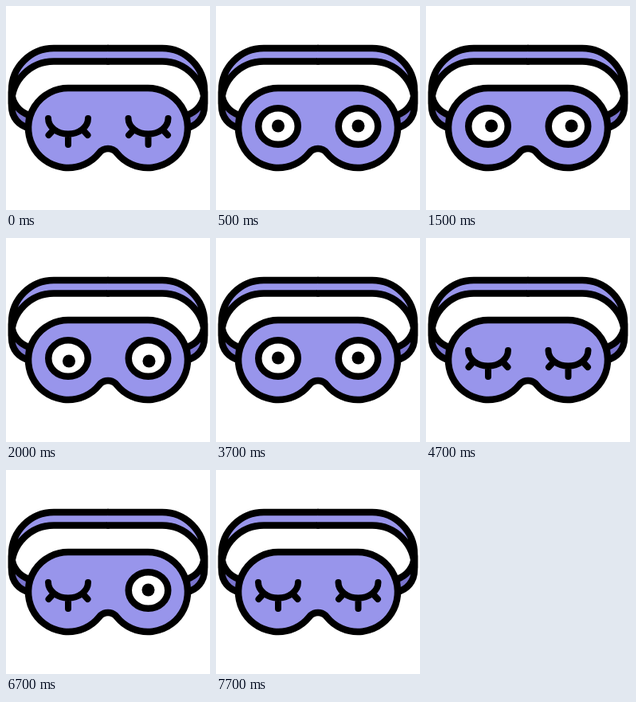
Animation of 256x256 px, one loop 8 s. Source, as an HTML page:

```html
<!DOCTYPE html>
<html lang="en">
<head>
<meta charset="utf-8">
<title>Sleep mask</title>
<style>
  html, body { margin: 0; width: 100%; height: 100%; overflow: hidden; background: #fff; }
  svg { display: block; width: 100%; height: 100%; }
  .line { stroke: #000; stroke-width: 8.5; stroke-linecap: round; stroke-linejoin: round; }
  .cloth { fill: #9895eb; }
  .shade { fill: #7a75cf; }
  .lid { fill: none; stroke-width: 8; }
</style>
</head>
<body>
<svg viewBox="0 0 256 256">
  <defs>
    <g id="strap">
      <path class="line shade" d="M7 108V125C7 140 16 150 29 153V137C17 133 8 123 7 108Z"/>
      <path class="cloth" d="M129 53H60A53 53 0 0 0 7 106C12 84 32 69.500 60 69.500H129Z"/>
      <path class="line" fill="none" d="M128 53H60A53 53 0 0 0 7 106V122.500A53 53 0 0 1 60 69.500H128"/>
    </g>
    <g id="eye">
      <path class="line lid" d="M-25 -10A25 19.500 0 0 0 25 -10M0 10V23M-18 4L-24.500 11M18 4L24.500 11"/>
      <g></g>
    </g>
  </defs>
  <use href="#strap"/>
  <use href="#strap" transform="matrix(-1 0 0 1 256 0)"/>
  <path class="line cloth" d="M78 103H178A50 50 0 1 1 139 184.300
    A14.100 14.100 0 0 0 117 184.300A50 50 0 1 1 78 103Z"/>
  <g id="left" transform="translate(78 151)"></g>
  <g id="right" transform="translate(178.500 151)"></g>
</svg>
<script>
  const DURATION = 8000;
  const GAZE_RADIUS = 4.1;
  const GAZE_STEP = 1.33; // radians turned by each glance
  const glances = [1500, 2000, 2500, 2700];
  const left = document.getElementById('left');
  const right = document.getElementById('right');
  const closedEye = document.querySelector('#eye .lid').outerHTML;

  const within = (t, from, to) => t >= from && t < to;

  // The pupils roll in hard steps, then return to the middle.
  function gazeAt(t) {
    if (!within(t, glances[0], 3700)) return [0, 0];
    const angle = GAZE_STEP * (glances.filter(start => start <= t).length - 1);
    return [GAZE_RADIUS * Math.cos(angle), GAZE_RADIUS * Math.sin(angle)];
  }

  function drawEye(eye, open, [x, y]) {
    const markup = open
      ? `<ellipse class="line" rx="24.750" ry="22.750" fill="#fff"/><circle cx="${x}" cy="${y - 0.5}" r="8"/>`
      : closedEye;
    if (eye.markup !== markup) eye.innerHTML = eye.markup = markup;
  }

  function tick(now) {
    const t = now % DURATION;
    const awake = within(t, 500, 4700);
    const peeking = within(t, 6700, 7700);
    const gaze = gazeAt(t);
    drawEye(left, awake, gaze);
    drawEye(right, awake || peeking, gaze);
    requestAnimationFrame(tick);
  }
  tick(performance.now());
</script>
</body>
</html>
```
